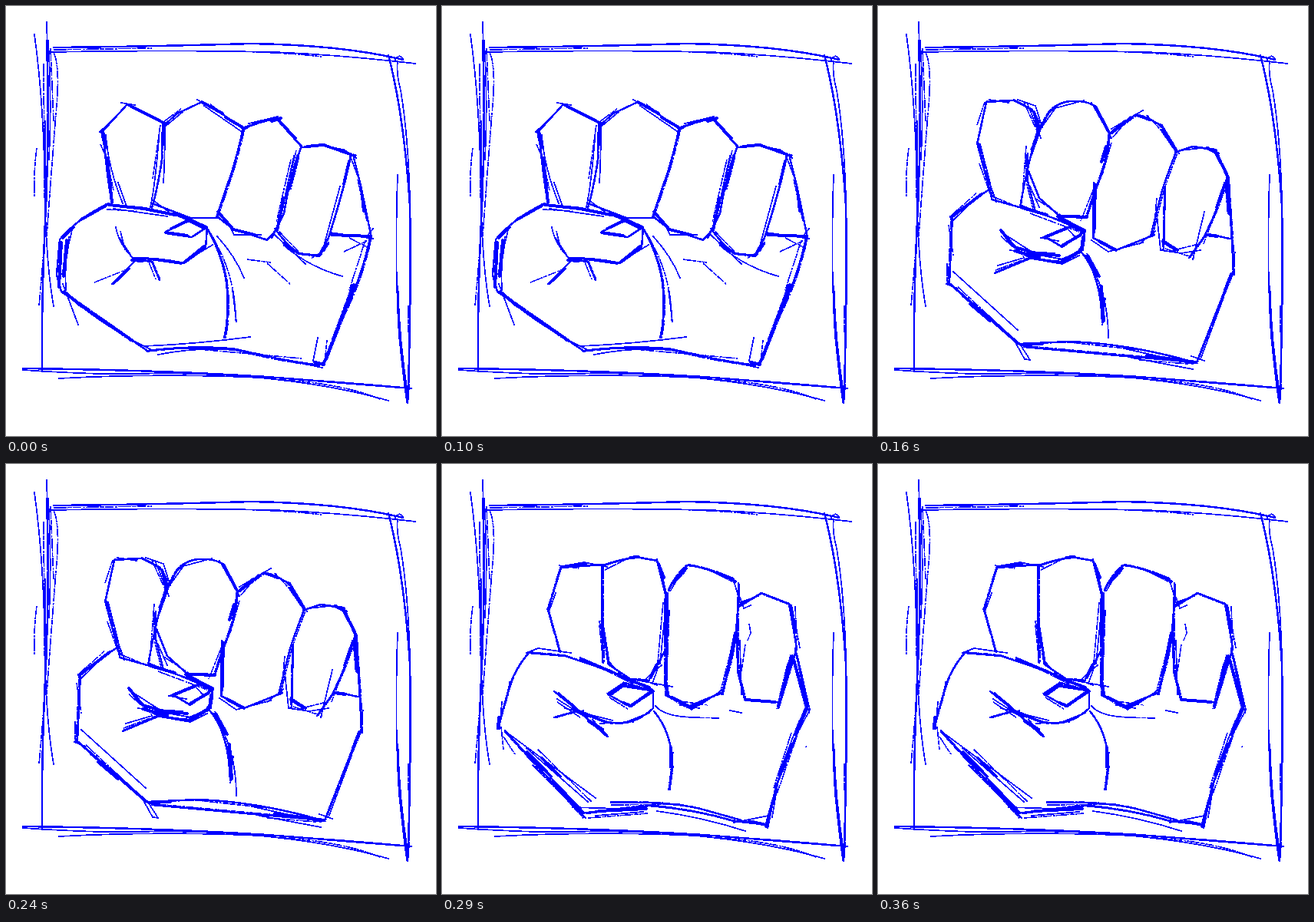
An HTML page for the animation above (0.41 s loop, 560 by 560 pixels).

```html
<!DOCTYPE html>
<html lang="en">
<head>
<meta charset="utf-8">
<title>Sketched fist</title>
<style>
html, body { margin: 0; width: 100%; height: 100%; overflow: hidden; background: #fff; }
svg { display: block; width: 100vw; height: 100vh; }
path { fill: none; stroke: #00f; stroke-linecap: round; stroke-linejoin: round; shape-rendering: crispEdges; }
.bold { stroke-width: 4; }
.mid { stroke-width: 2.5; }
.thin { stroke-width: 1.7; }
.dry { stroke-width: 1.6; stroke-dasharray: 17 1 6 1 11 2 3 1; stroke-linecap: butt; }
</style>
</head>
<body>
<svg id="stage" viewBox="0 0 560 560"></svg>
<script>
// Each part is a set of pen strokes, grouped by pen weight.
const border = [
  { // top and right
    mid: 'M62 54Q180 53 320 49Q440 51 517 70M498 64Q518 140 526 260Q528 400 523 517M510 365Q512 440 524 512',
    thin: 'M57 60Q200 57 350 60Q440 64 533 75M510 72Q508 88 514 110Q526 180 527 300M507 70Q512 61 517 69M510 220Q506 340 512 430Q517 480 522 516M519 488L522 508',
    dry: 'M62 57L190 55M300 59Q370 61 411 66M524 390L525 500'
  },
  { // bottom and left
    mid: 'M22 472Q200 474 340 483Q430 490 528 498M53 45Q57 150 52 260Q46 380 47 476M51 150L51 300',
    thin: 'M22 474Q140 482 200 478Q330 480 520 497M69 485Q200 478 330 484Q430 494 498 514M53 21L54 60M37 37Q50 130 51 260Q53 340 62 391M55 45Q60 120 56 200',
    dry: 'M360 487Q440 492 487 512M62 60Q71 80 65 140Q58 230 53 300M40 185Q36 215 37 248M49 75L50 250M53 250Q49 330 43 390M58 55L62 150'
  }
];

const poses = [
  { hold: 160, parts: [
    { // two left fingers
      bold: 'M126 163L131 184M132 198L138 256M160 129L203 151M255 125L282 140M286 145L308 158M205 155L205 180',
      mid: 'M126 163L158 128M127 166Q130 210 138 258M204 152L203 200Q198 235 190 263M204 157L223 140L255 125M309 159Q300 200 290 228L274 275M193 258L240 276L276 276',
      thin: 'M150 126L168 129M122 164L141 146M130 168Q133 210 152 257M207 152Q207 200 205 230M200 160Q195 230 188 262M249 122L300 152M258 130L306 163M206 158L230 138M146 230L156 258M194 255L212 268',
      dry: 'M123 180L134 205M125 170L140 240M201 155L191 225M266 128L308 160M205 151L228 134'
    },
    { // two right fingers
      bold: 'M358 146L346 150M276 268L296 291L324 298M380 195L369 238M362 250L353 292M447 202L440 232M362 309L381 322M464 248L466 267M424 298L474 300M392 183L412 181',
      mid: 'M310 159L330 152L352 146L386 184M385 182Q370 220 362 270L346 302M276 275L295 290L340 305L353 291M386 184L412 181L455 196M449 195Q440 240 420 302L408 324M350 290Q365 310 380 322L408 325L420 308M453 198L462 234L475 297',
      thin: 'M316 153L354 144M375 195L354 290M382 190L368 240M412 182L440 187L456 198M435 235L414 312M450 200L462 232M422 295L478 303M355 147L378 172M288 280L297 298L332 298',
      dry: 'M309 162L330 149M378 188L359 270M371 200L352 282M458 226L470 280M356 294L386 325M398 328L416 318M447 302L474 316'
    },
    { // thumb
      bold: 'M134 259L180 264L220 272M218 270L240 279L260 289M208 295L236 299M215 290L237 279M258 313L232 334M164 331L178 332M140 361L160 342',
      mid: 'M130 258L180 263L235 275L262 288L260 315L232 335Q200 328 165 328M208 294L238 280L258 290L242 301L208 296M165 330L190 333L200 357',
      thin: 'M165 328Q147 310 143 288M138 362L168 332M180 329L228 336L269 311M140 264L210 274M148 302L166 330',
      dry: 'M115 360L160 342M149 293L155 318M240 328L262 310M131 265L170 267M185 331L195 356'
    },
    { // palm
      bold: 'M72 308L69 366M79 305L75 352M76 372L98 391M125 408L165 436M98 278L130 260M453 363L417 460M402 464L414 467M74 302L88 288',
      mid: 'M134 257Q95 275 70 304L66 350L72 372L184 449M184 449Q250 441 300 447Q350 460 408 468M475 297Q465 350 440 400L412 468M262 290Q285 330 288 370Q290 410 284 432',
      thin: 'M86 292Q75 330 78 370M74 362L94 415M74 372Q130 420 190 448M180 443Q250 440 318 431M198 454Q280 438 350 458L412 471M350 298L390 336M362 312Q395 340 438 352M275 300Q298 325 310 354M295 370L300 411M400 462L406 432M470 300L478 290',
      dry: 'M264 292Q300 350 299 410M82 300L73 350M80 375L175 442M314 330L345 334M340 335L370 362M468 305L447 370M415 465L418 435M422 450L450 380M240 446L385 459M440 320L470 306'
    }
  ] },
  { hold: 130, parts: [
    { // two left fingers
      bold: 'M203 138L209 158M209 166L201 188M283 131L300 163M297 183L291 203M243 274L272 275',
      mid: 'M129 180L141 125L177 123L200 135L210 152M129 178L148 250M210 155Q196 200 185 262M208 165L222 140Q232 126 250 124Q272 123 282 130L302 166M302 166Q300 200 285 236L272 275M196 215L210 250L236 273L272 274M195 192L195 228L205 268',
      thin: 'M145 122L170 126M182 122L205 130L214 158M195 128L212 172M133 180L146 230M212 160L198 200M278 126L304 172M206 168L231 133L268 123M140 215L154 255M190 230L186 262M198 235L210 262',
      dry: 'M129 155L139 125M190 125L208 165M193 182L188 248M304 178L292 220M204 250L242 275M280 240L264 280M132 205L148 250'
    },
    { // two right fingers
      bold: 'M304 165L322 150M337 142L354 148M370 162L388 188M281 240L281 295M288 306L310 318M430 186L443 192M440 192L454 218M371 306L390 318M454 234L457 270M428 298L442 300',
      mid: 'M302 166L336 141Q358 146 372 160L388 190M388 190Q375 225 370 240L355 300M281 230L280 302L310 318L360 298M388 190L410 183L440 187L455 222M455 222Q445 260 425 300L405 328M374 236L372 318M455 220L460 290L463 345M430 297L458 303',
      thin: 'M304 160L345 136M310 160L332 146M340 142L370 155L392 192M284 232L283 290M278 305L300 320L345 308M395 188L430 184M440 188L457 225M362 262L368 318L395 322L420 318M425 268L410 330M451 230L440 262',
      dry: 'M306 171L330 142M350 142L384 178M363 250L359 298M450 240L424 310M458 232L461 310M374 316L412 328M340 310L362 293M385 318L418 310'
    },
    { // thumb
      bold: 'M160 292L178 314L205 322L236 325M188 263L220 272M234 274L268 292M267 301L265 318L240 332M220 300L247 289M178 319L210 328M240 312L264 298',
      mid: 'M148 252L195 265L240 280L270 292M268 292Q272 320 240 334L200 328Q175 318 160 292M214 302L250 287L268 294L240 314L218 301M152 348L195 330L218 322',
      thin: 'M188 260L270 294M166 298L200 320L230 322M205 330L240 336L262 325M156 338L190 328M172 318L242 330M245 288L256 300M212 302L235 306',
      dry: 'M153 344L212 322M160 300L190 326M198 270L262 294M248 284L270 298M230 333L266 319M146 247L174 258'
    },
    { // palm
      bold: 'M97 274L135 245M120 388L146 410M150 411L182 439M188 441L214 440M350 455L412 464M291 365L294 410M460 349L452 370M273 325L288 352',
      mid: 'M146 238L97 272L93 360M91 360L186 442M184 440L250 437Q330 440 415 465M190 444L300 454L412 464M463 345L440 400L415 464M266 322Q290 350 292 412',
      thin: 'M97 280L130 248M95 362L185 440M110 378L186 442L198 461M98 346L182 422M270 325Q300 370 300 432M320 446L410 466M330 458L410 473M462 315L464 350M450 380L420 460M180 440L191 460L198 461M408 456L425 462',
      dry: 'M92 285L98 325M93 275L128 244M88 362L105 368M104 366L172 429M90 335L90 362M272 322L293 382M296 380L292 417M240 437L350 449M340 461L404 466M455 360L428 430M465 320L461 350'
    }
  ] },
  { hold: 120, parts: [
    { // two left fingers
      bold: 'M156 134L187 131M246 122L256 121M282 130L289 148M291 176L291 235M280 261L272 278',
      mid: 'M138 190L155 135L210 131M138 188L154 245M208 133L209 258M210 132Q232 124 254 121L280 126L291 170M291 170L292 240L270 280M209 205L218 262L245 280L270 282',
      thin: 'M157 133L185 128L215 134M140 190L148 168M280 124L294 175M290 200L284 260M294 180L290 290M205 205L215 245M218 258L232 273M263 282L286 262M149 150L154 135',
      dry: 'M152 132L178 136M284 132L292 168M288 180L280 270M296 190L293 270M212 138L240 124M205 210L210 260M274 286L288 246M147 222L155 246'
    },
    { // two right fingers
      bold: 'M300 155L318 136M358 141L382 153M293 175L293 208M292 285L294 300M300 304L324 317L342 309M382 220L371 275M388 184L397 178M453 184L460 219M395 307L434 310M456 250L442 302',
      mid: 'M295 165Q304 145 320 132Q342 134 380 150M294 168L292 300L320 316L364 298M386 155Q386 220 375 260L364 300M386 186L416 168L452 182L462 240M384 200L385 270L394 306L436 310M462 240L438 318',
      thin: 'M298 158L318 134M320 132L342 136L380 152L388 180M384 215L366 300M295 302L325 320L345 308L368 292M388 180L412 172M388 230L390 300M455 250L440 310M385 165L393 188L402 184M310 314L335 318',
      dry: 'M297 166L310 144M290 215L290 290M381 225L363 295M400 208L402 220L398 230M395 235L390 270M460 205L466 240M450 260L436 319M304 308L346 314M460 185L462 230'
    },
    { // thumb
      bold: 'M180 255L220 270M232 277L270 291M220 300L238 287M238 289L270 294M236 311L246 315L270 298M152 300L172 316M170 319L202 331M191 335L209 347',
      mid: 'M113 246L160 250L220 270L275 295M275 295L275 318Q250 342 215 336L175 322M146 330L175 322M146 296L178 322L215 355M216 300L238 285L276 296L245 316L216 300',
      thin: 'M110 246L125 240L168 246M180 252L245 280L300 290M150 306L210 345M152 298L180 322M160 318L222 334M196 333L215 353M235 338L270 324M258 280L280 288',
      dry: 'M150 310L180 330M148 298L190 330M190 257L250 287M218 304L242 319M205 338L250 336M154 327L185 321'
    },
    { // palm
      bold: 'M74 330L73 344M111 375L142 407M145 413L184 454M204 452L266 449M458 255L475 318M474 318L460 352M456 365L443 400M432 435L422 472M400 465L422 470M298 370L298 394M130 383L154 407',
      mid: 'M113 246Q92 270 85 300L72 345M82 347L185 460M188 455L270 445Q330 450 380 465L425 470M460 240L476 318L435 420L424 474M276 322Q300 350 300 395L296 424M220 441Q300 439 340 450L390 464',
      thin: 'M78 310L75 345M85 350L200 435M110 370L190 440M115 380L185 455M170 447L265 450M200 458L262 453M280 452Q340 460 395 478M278 315Q290 330 332 330M375 321L390 324M465 335L440 400L430 460M463 250L479 320L466 345M380 467L425 458',
      dry: 'M88 283L86 300M77 342L80 372M80 355L95 378M125 372L195 440M118 392L188 462M190 461L268 455M325 330L362 331M301 375L295 425M468 270L478 325M455 350L432 422M462 355L436 430M474 368L475 369M220 444L310 443'
    }
  ] }
];

const SVG = 'http://www.w3.org/2000/svg';
const stage = document.getElementById('stage');

function add(tag, parent, attrs = {}) {
  const node = parent.appendChild(document.createElementNS(SVG, tag));
  for (const key in attrs) node.setAttribute(key, attrs[key]);
  return node;
}

let seed = 7;
function wobble(size) {
  seed = seed * 16807 % 2147483647;
  return (seed / 2147483647 * 2 - 1) * size;
}

// Goes over a stroke again with a drier, slightly shifted pen.
function retrace(group, stroke) {
  const shift = `translate(${wobble(2)} ${wobble(1.5)})`;
  add('path', group, { class: 'dry', d: stroke, transform: shift });
}

function draw(parts, sketchy) {
  const group = add('g', stage);
  for (const part of parts)
    for (const pen in part) {
      add('path', group, { class: pen, d: part[pen] });
      if (sketchy && (pen === 'bold' || pen === 'mid'))
        for (const stroke of part[pen].match(/M[^M]+/g)) retrace(group, stroke);
    }
  return group;
}

draw(border, false);
const groups = poses.map(pose => draw(pose.parts, true));
const loop = poses.reduce((sum, pose) => sum + pose.hold, 0);

// Hard cuts: each pose is visible only during its own share of the loop.
let begin = 0;
poses.forEach((pose, i) => {
  const end = begin + pose.hold;
  const steps = [[0, begin === 0], [begin, true], [end, false], [loop, end === loop]];
  groups[i].animate(
    steps.map(([time, on]) => ({ offset: time / loop, opacity: on ? 1 : 0, easing: 'step-end' })),
    { duration: loop, iterations: Infinity }
  );
  begin = end;
});
</script>
</body>
</html>
```
